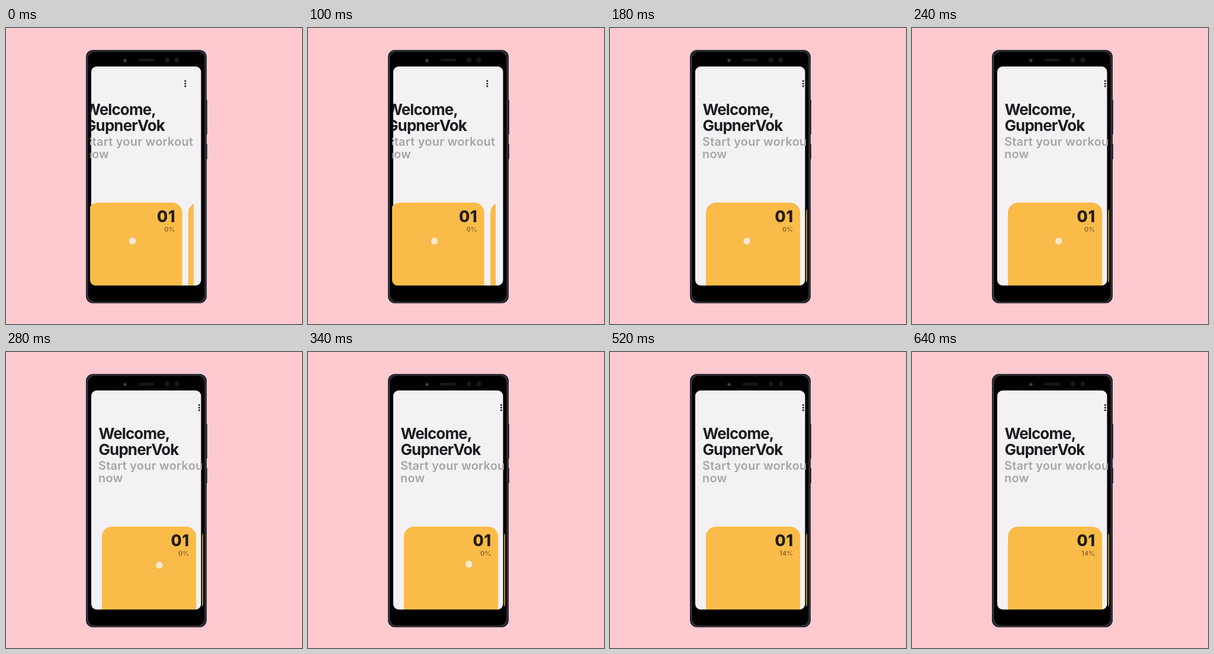
These frames come from a looping animation (500 by 500 pixels, 1440 ms). An HTML page:

```html
<!DOCTYPE html>
<html lang="en">
<head>
<meta charset="utf-8">
<title>Workout screen</title>
<style>
  html, body { margin: 0; width: 100%; height: 100%; overflow: hidden; background: #ffcacf; }
  svg { display: block; width: 100%; height: 100%; }
  text { font-family: Inter, Roboto, sans-serif; }
  .title { font-size: 26px; font-weight: 700; letter-spacing: -.035em; fill: #1d1b20; }
  .sub { font-size: 20px; font-weight: 600; letter-spacing: .01em; fill: #a6a5a9; }
  .num { font-size: 26.5px; font-weight: 800; letter-spacing: .03em; fill: #211c18; text-anchor: end; }
  .pct { font-size: 11px; font-weight: 600; fill: #8a6730; text-anchor: end; }
</style>
</head>
<body>
<svg viewBox="0 0 500 500">
  <defs>
    <clipPath id="screen"><rect x="142" y="65" width="191" height="370" rx="9"/></clipPath>
    <clipPath id="page"><rect x="130" y="65" width="210.5" height="371"/></clipPath>
  </defs>
  <rect width="500" height="500" fill="#ffcacf"/>

  <g fill="#35363f">
    <rect x="337" y="121" width="3" height="59" rx="1"/>
    <rect x="337" y="196" width="3" height="26" rx="1"/>
  </g>
  <rect x="135" y="37" width="204" height="428" rx="12" fill="#1c1d25"/>
  <rect x="137" y="38.7" width="200" height="424.6" rx="12" fill="none" stroke="#4b4c5a"/>
  <rect x="139" y="40" width="196" height="422" rx="13" fill="#000"/>
  <rect x="223.5" y="52" width="27" height="4.5" rx="2.2" fill="#17181b"/>
  <circle cx="201" cy="55" r="3.8" fill="#10191c"/>
  <circle cx="201" cy="54.7" r="1.8" fill="#2c6a65"/>
  <circle cx="272" cy="54" r="4.2" fill="#18191c"/>
  <circle cx="288.5" cy="54" r="4.2" fill="#18191c"/>

  <rect x="144" y="65" width="185.5" height="370" rx="9" fill="#f3f1f4"/>
  <g clip-path="url(#screen)">
    <g id="content" clip-path="url(#page)">
      <g fill="#1d1b20">
        <circle cx="326.3" cy="89.6" r="1.5"/>
        <circle cx="326.3" cy="93.9" r="1.5"/>
        <circle cx="326.3" cy="98.2" r="1.5"/>
      </g>
      <text class="title" x="156.5" y="147">Welcome,</text>
      <text class="title" x="156.5" y="174">GupnerVok</text>
      <text class="sub" x="156" y="198.5">Start your workout</text>
      <text class="sub" x="156" y="219.5">now</text>
      <g fill="#fbbb48">
        <rect x="162" y="295" width="159.2" height="170" rx="17"/>
        <rect x="331.5" y="295" width="159.2" height="170" rx="17"/>
      </g>
      <text class="num" x="310" y="328.2">01</text>
      <text class="pct" id="pct" x="309.3" y="344">0%</text>
    </g>
    <g id="touch">
      <circle r="7" fill="#f3d296" stroke="#e3ab4c" stroke-width=".8"/>
      <circle id="dot" r="5.4"/>
    </g>
  </g>
</svg>
<script>
const LOOP = 1440, TICK = 20;
const JUMP = 120, COUNTED = 400, FADE_START = 400, FADE_END = 520;
const [content, pct, touch, dot] =
  ['content', 'pct', 'touch', 'dot'].map(id => document.getElementById(id));

// touch path as [ms, x, y]
const path = [
  [100, 213.5, 360], [120, 219.3, 360], [180, 231.2, 360],
  [280, 259, 360], [360, 276, 358], [440, 279, 354.5]
];

const clamp = v => Math.min(1, Math.max(0, v));
const mix = (a, b, k) => a + (b - a) * k;

function touchAt(t) {
  const last = path[path.length - 1];
  if (t >= last[0]) return last.slice(1);
  const i = Math.max(1, path.findIndex(p => p[0] >= t));
  const [a, b] = [path[i - 1], path[i]];
  const k = clamp((t - a[0]) / (b[0] - a[0]));
  return [mix(a[1], b[1], k), mix(a[2], b[2], k)];
}

function draw(ms) {
  const t = Math.floor(ms % LOOP / TICK) * TICK;
  const [x, y] = touchAt(t);
  const fade = clamp((t - FADE_START) / (FADE_END - FADE_START));
  const dim = clamp(fade * 3);
  content.setAttribute('transform', `translate(${t < JUMP ? -23.5 : 0} 0)`);
  pct.textContent = t < COUNTED ? '0%' : '14%';
  touch.setAttribute('transform', `translate(${x} ${y})`);
  touch.setAttribute('opacity', 1 - fade);
  dot.setAttribute('fill', `rgb(${mix(249, 192, dim)},${mix(231, 184, dim)},${mix(198, 150, dim)})`);
}

const start = performance.now();
(function frame() {
  draw(performance.now() - start);
  requestAnimationFrame(frame);
})();
</script>
</body>
</html>
```
